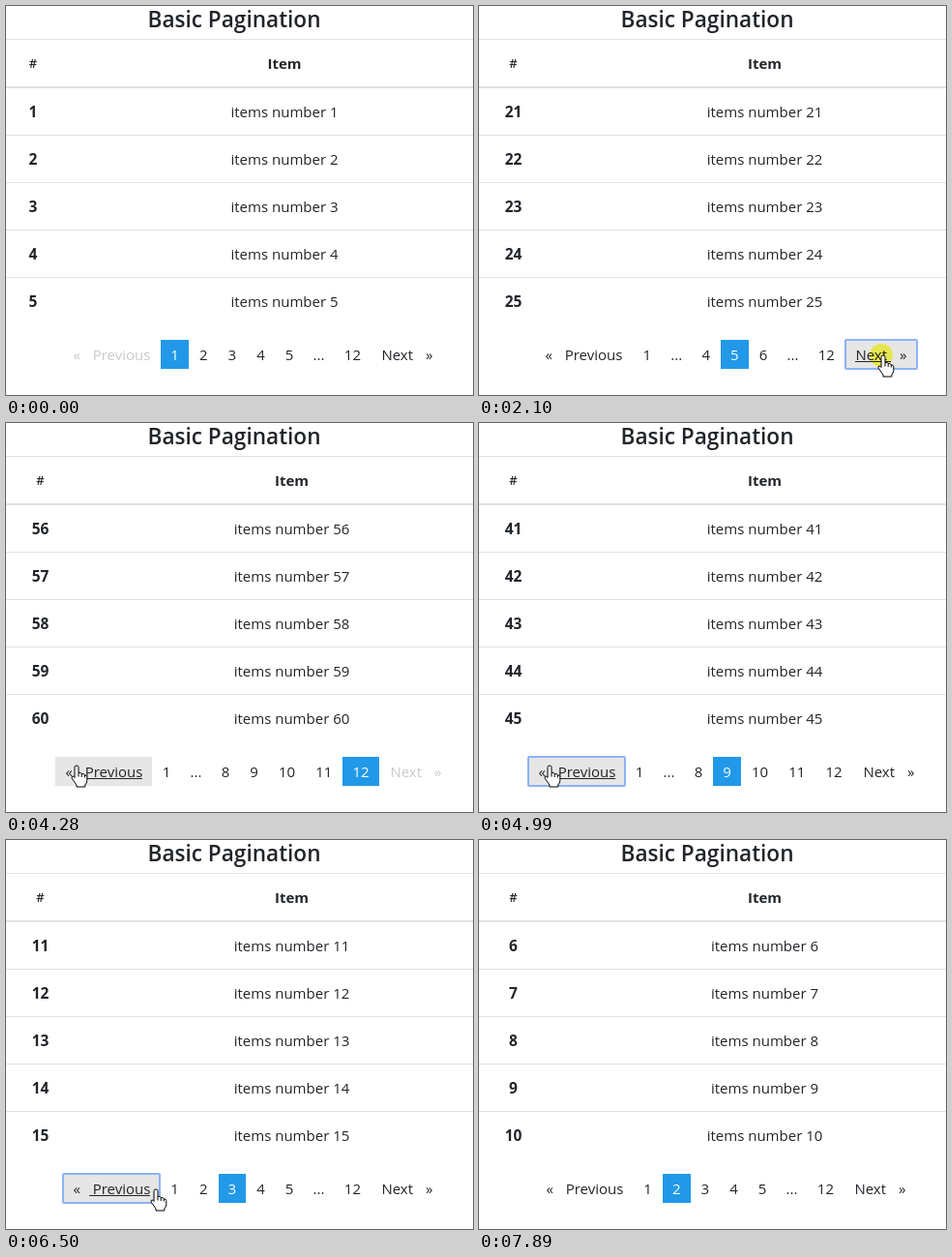
Recreate the animation shown at these times as an HTML page. Size 483 by 402 pixels, loop 8010 ms.

```html
<!DOCTYPE html>
<html lang="en">
<head>
<meta charset="utf-8">
<title>Basic Pagination</title>
<style>
html, body { margin: 0; width: 100%; height: 100%; overflow: hidden; background: #fff; }
svg { display: block; font: 15px "Open Sans", "Noto Sans", sans-serif; fill: #212529; }
.title { font-size: 22.6px; font-weight: 600; }
.head { font-weight: 700; }
.hash { font-size: 13px; font-weight: 600; }
.num { font-size: 15.5px; font-weight: 700; }
.mid { text-anchor: middle; }
.line { fill: #dee2e6; }
.on { fill: #fefefe; }
.off { fill: #cacaca; }
.ring { fill: none; stroke: #8db3f3; stroke-width: 2; }
.spot { fill: #ffff58; mix-blend-mode: multiply; }
.pointer { fill: #fff; stroke: #000; stroke-linejoin: round; }
</style>
</head>
<body>
<svg id="stage" width="483" height="402" viewBox="0 0 483 402"></svg>
<script>
const LOOP = 8010, PAGES = 12, ROWS = 5, HOLD = 70, STEP = 60, BLUR = 7890;

// Bursts of clicks: first and last press, count, page change per click
const bursts = [
  [540, 1720, 4, 1], [2100, 2790, 4, 1], [3160, 3720, 3, 1],
  [4410, 4720, 2, -1], [4920, 5590, 4, -1], [5730, 6110, 3, -1], [7060, 7060, 1, -1]
];
const clicks = bursts.flatMap(([from, to, count, dir]) =>
  Array.from({ length: count }, (_, i) => {
    const pace = (i / Math.max(1, count - 1)) ** (from < 1000 ? 0.8 : 1);
    return { at: from + (to - from) * pace, dir };
  }));

// Pointer glides: start, end, and the point reached (y = 410 is off stage)
const glides = [
  [0, 1, 340, 410], [130, 400, 418, 361], [4100, 4280, 73, 354], [5200, 5590, 105, 355],
  [6040, 6180, 155, 361], [6560, 6680, 270, 410], [6890, 7000, 128, 362], [7270, 7460, 300, 410]
];

const HAND = 'M-2 12.5V1.6a2 1.6 0 0 1 4 0V7.5q2.8-.8 3.2 1.2 2.6-.8 3.1 1.2 2.3-.3 2.5 1.8v3.8' +
  'q0 2.5-2 4.5V22H0v-2l-4.5-6.2q-1.3-2 .3-2.8 1.2-.3 2.2 1.5zM2 7.5v4M5.2 8.7v3.3M8.3 9.9v2.6';
const ARROW = 'M0 0V16l3.7-3.5 2.5 6 2.3-1-2.5-5.8H11z';

const text = (x, y, str, cls = '') => `<text x="${x}" y="${y}" class="${cls}">${str}</text>`;
const rect = (x, y, w, h, attrs = '') =>
  `<rect x="${x}" y="${y}" width="${w}" height="${h}" ${attrs}/>`;

function labels(page) {
  if (page <= 4) return [1, 2, 3, 4, 5, '...', PAGES];
  if (page > PAGES - 4) return [1, '...', 8, 9, 10, 11, 12];
  return [1, '...', page - 1, page, page + 1, '...', PAGES];
}

function layout(page) {
  const cells = [
    { label: 'Previous', w: 100, off: page === 1 },
    ...labels(page).map(label => ({
      label,
      w: 20 + (label === '...' ? 10.4 : 8.62 * String(label).length),
      off: label === '...',
      on: label === page
    })),
    { label: 'Next', w: 74, off: page === PAGES }
  ];
  const total = cells.reduce((sum, c) => sum + c.w + 1, -1);
  let x = 255.67 - total / 2;
  for (const c of cells) {
    c.x = x;
    x += c.w + 1;
  }
  return cells;
}

function table(page) {
  const shift = page === 1 ? 0 : 7.5;
  const numX = 28 + shift, itemX = 288 + shift;
  let out = text(236, 22, 'Basic Pagination', 'title mid') +
    rect(0, 34, 483, 1, 'class="line"') + rect(0, 83, 483, 2, 'class="line"') +
    text(numX, 64, '#', 'hash mid') + text(itemX, 65, 'Item', 'head mid');
  for (let i = 0; i < ROWS; i++) {
    const n = (page - 1) * ROWS + i + 1, y = 115 + i * 49;
    if (i) out += rect(0, y - 31, 483, 1, 'class="line"');
    out += text(numX, y, n, 'num mid') + text(itemX, y, 'items number ' + n, 'mid');
  }
  return out;
}

function cell(c, hover, focus) {
  const x = Math.round(c.x), w = Math.round(c.x + c.w) - x;
  const cls = c.on ? 'on' : c.off && c.label !== '...' ? 'off' : '';
  const underline = (from, len) => hover ? rect(x + from, 367, len, 1) : '';
  let out = '';
  if (c.on || hover) out += rect(x, 345, w, 30, `fill="${c.on ? '#2199e8' : '#e6e6e6'}"`);
  if (focus) out += rect(x, 345, w, 30, 'rx="1" class="ring"');
  if (c.label === 'Previous')
    out += text(x + 10.5, 366, '«', cls) + text(x + 30.7, 366, c.label, cls) + underline(27, 63);
  else if (c.label === 'Next')
    out += text(x + 10.4, 366, c.label, cls) + text(x + 56, 366, '»', cls) + underline(10, 37);
  else
    out += text(c.x + c.w / 2, 366, c.label, cls + ' mid');
  return out;
}

function pointer(t) {
  let x = 0, y = 0;
  for (const [from, to, toX, toY] of glides) {
    if (t < from) break;
    // The pointer moves in visible jumps
    const p = Math.min(1, (Math.floor((t - from) / STEP) + 1) * STEP / (to - from));
    x += (toX - x) * p;
    y += (toY - y) * p;
  }
  return [Math.round(x), Math.round(y)];
}

function stateAt(t) {
  const page = clicks.reduce((n, c) => c.at + HOLD <= t ? n + c.dir : n, 1);
  const pressed = clicks.some(c => c.at <= t && t < c.at + HOLD);
  const latest = clicks.filter(c => c.at <= t).pop();
  const focus = latest && t < BLUR ? (latest.dir > 0 ? 'Next' : 'Previous') : '';
  return [page, ...pointer(t), pressed, focus];
}

function draw(page, mx, my, pressed, focus) {
  const cells = layout(page);
  const hit = cells.find(c => !c.off && !c.on &&
    mx >= c.x && mx < c.x + c.w && my >= 345 && my < 375);
  let out = table(page) +
    cells.map(c => cell(c, c === hit, c.label === focus && !c.off)).join('');
  if (pressed) out += `<circle cx="${mx - 2}" cy="${my}" r="12" class="spot"/>`;
  return out + `<path class="pointer" transform="translate(${mx} ${my})" d="${hit ? HAND : ARROW}"/>`;
}

const stage = document.getElementById('stage');
const start = performance.now();
let shown = '';

function tick() {
  const state = stateAt((performance.now() - start) % LOOP);
  const key = state.join();
  if (key !== shown) {
    stage.innerHTML = draw(...state);
    shown = key;
  }
  requestAnimationFrame(tick);
}
tick();
</script>
</body>
</html>
```
